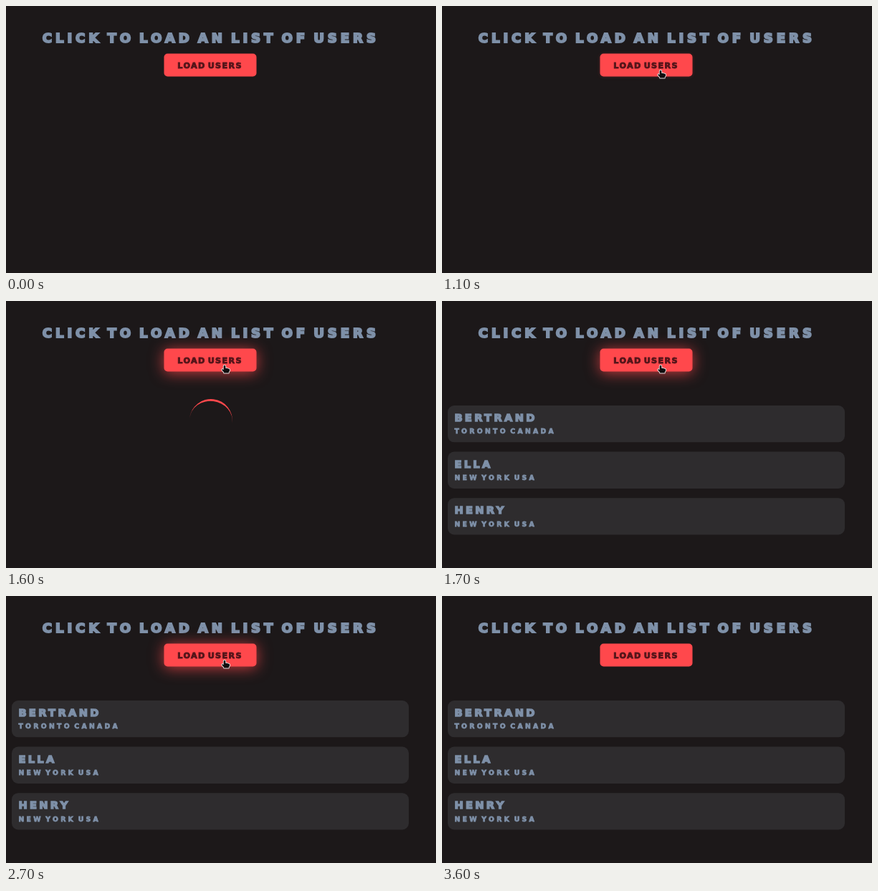
Recreate the animation shown at these times as an HTML page with a canvas. Size 600 by 373 pixels, loop 5.8 s.

```html
<!DOCTYPE html>
<html lang="en">
<head>
<meta charset="utf-8">
<title>Load users</title>
<style>
  html, body { margin: 0; width: 100%; height: 100%; overflow: hidden; background: #1c1819; }
  canvas { display: block; width: 600px; height: 373px; }
</style>
</head>
<body>
<canvas id="stage" width="600" height="373"></canvas>
<script>
const ctx = document.getElementById('stage').getContext('2d');
const LOOP = 5800, STEP = 100;
const BG = '#1c1819', CARD = '#2e2c2e', BLUE = '#7e90a8', RED = '#ff484c', INK = '#55151a';

const USERS = [
  ['BERTRAND', 'TORONTO CANADA'],
  ['ELLA', 'NEW YORK USA'],
  ['HENRY', 'NEW YORK USA']
];

// Type styles: size, letter and word spacing, extra weight
const TITLE = { size: 18.2, letter: 4.9, word: -4.2, weight: 2, color: BLUE };
const LABEL = { size: 11.2, letter: 1.35, word: -2.2, weight: 0.9, color: INK };
const NAME = { size: 14.6, letter: 3.35, word: 0, weight: 1.5, color: BLUE };
const PLACE = { size: 9.3, letter: 3.3, word: -3, weight: 0.8, color: BLUE };

// Cursor stops
const EDGE = { x: 569, y: 204 }, REST = { x: 335, y: 185 };
const CLICK = { x: 305, y: 90 }, AWAY = { x: 500, y: 213 };

const progress = (t, from, to) => Math.min(1, Math.max(0, (t - from) / (to - from)));
const smooth = p => p * p * (3 - 2 * p);
const mix = (a, b, p) => ({ x: a.x + (b.x - a.x) * p, y: a.y + (b.y - a.y) * p });

function cursorAt(t) {
  if (t < 700) return mix(EDGE, REST, smooth(progress(t, 200, 700)));
  if (t < 3200) return mix(REST, CLICK, smooth(progress(t, 700, 1100)));
  return mix(CLICK, AWAY, progress(t, 3200, 3600));
}

const glowAt = t => smooth(progress(t, 1000, 1300)) - smooth(progress(t, 3200, 3500));

function text(str, x, y, style) {
  ctx.font = `bold ${style.size}px "DejaVu Sans", sans-serif`;
  ctx.letterSpacing = style.letter + 'px';
  ctx.wordSpacing = style.word + 'px';
  ctx.fillStyle = ctx.strokeStyle = style.color;
  ctx.lineWidth = style.weight;
  ctx.lineJoin = 'miter';
  ctx.miterLimit = 3;
  ctx.strokeText(str, x, y);
  ctx.fillText(str, x, y);
}

function box(x, y, w, h, r, color) {
  ctx.fillStyle = color;
  ctx.beginPath();
  ctx.roundRect(x, y, w, h, r);
  ctx.fill();
}

function button(glow) {
  ctx.save();
  ctx.shadowColor = `rgba(255,72,76,${0.75 * glow})`;
  ctx.shadowBlur = 20 * glow;
  ctx.shadowOffsetY = 2 * glow;
  box(220.5, 66.5, 129, 32, 5, RED);
  ctx.restore();
  text('LOAD USERS', 239.3, 86.5, LABEL);
}

// Crescent left by a ring with only a top border
function spinner(angle) {
  ctx.save();
  ctx.translate(286, 167);
  ctx.rotate(angle);
  ctx.fillStyle = RED;
  ctx.beginPath();
  ctx.arc(0, 0, 30, Math.PI, 0);
  ctx.ellipse(0, 0, 30, 27.2, 0, 0, Math.PI, true);
  ctx.fill();
  ctx.restore();
}

function cards() {
  USERS.forEach(([name, place], i) => {
    const y = 146 + i * 64.6;
    box(8, y, 554, 51.3, 9, CARD);
    text(name, 17.4, y + 22, NAME);
    text(place, 17.4, y + 39.4, PLACE);
  });
}

const ARROW = new Path2D('M0 0V13.2L3 10.4L5 15L7.2 14L5.3 9.6H9.2Z');
const HAND = new Path2D('M0 0Q1.3 0 1.3 1.3V4Q2.5 3.4 3.2 4.3Q4.5 3.8 5.2 4.7' +
  'Q7 4.4 7 6V7.6L5.8 9.2V10.6H-.9V9.6L-3.6 6.6Q-4 5.2 -2.7 5.2L-1.3 6.2V1.3Q-1.3 0 0 0Z');

function cursor({ x, y }) {
  const hover = y < 98 && x < 349;
  const shape = hover ? HAND : ARROW;
  ctx.save();
  ctx.translate(x, y);
  ctx.lineJoin = 'round';
  ctx.lineWidth = 1.8;
  ctx.strokeStyle = '#e4e0e1';
  ctx.fillStyle = '#100d0e';
  ctx.stroke(shape);
  ctx.fill(shape);
  ctx.restore();
}

function draw(t) {
  ctx.fillStyle = BG;
  ctx.fillRect(0, 0, 600, 373);
  text('CLICK TO LOAD AN LIST OF USERS', 50.7, 51.2, TITLE);
  button(glowAt(t));
  if (t >= 1600 && t < 1700) spinner(0.12);
  if (t >= 1700) cards();
  if (t >= 200 && t < 3600) cursor(cursorAt(t));
}

const start = performance.now();
function tick(now) {
  const t = Math.max(0, now - start) % LOOP;
  draw(Math.floor(t / STEP) * STEP);
  requestAnimationFrame(tick);
}
draw(0);
requestAnimationFrame(tick);
</script>
</body>
</html>
```
